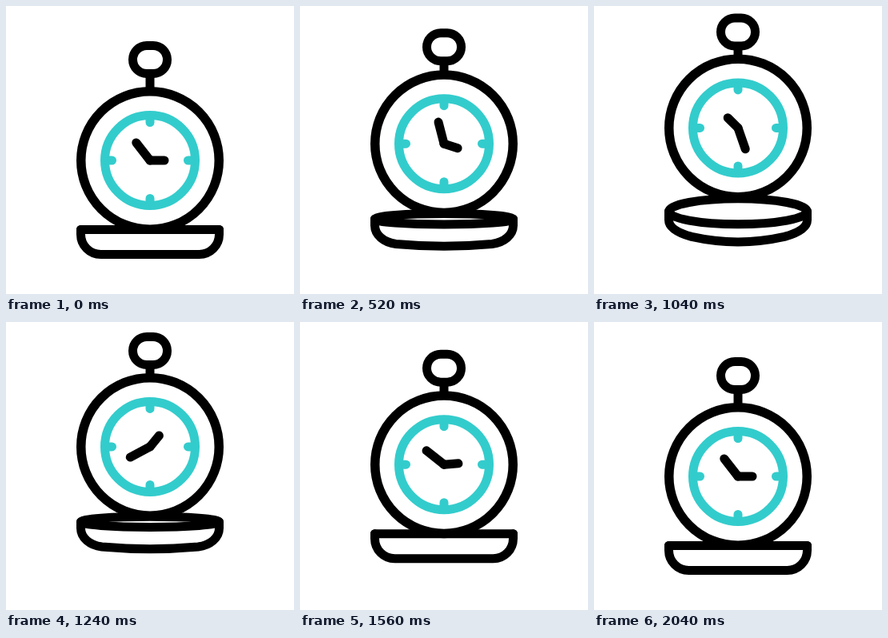
An HTML page for the animation above (2.08 s loop, 360 by 360 pixels).

```html
<!DOCTYPE html>
<html lang="en">
<head>
<meta charset="utf-8">
<title>Pocket watch</title>
<style>
  html, body { margin: 0; width: 100%; height: 100%; overflow: hidden; background: #fff; }
  svg { display: block; width: 100vw; height: 100vh; }
  .line { fill: none; stroke: #000; stroke-width: 11; stroke-linecap: round; stroke-linejoin: round; }
  .dial { stroke: #33cccc; }
</style>
</head>
<body>
<svg viewBox="0 0 360 360">
  <g id="watch" class="line">
    <path id="dish"/>
    <path id="rim"/>
    <g id="crown">
      <rect x="158.5" y="49.5" width="43" height="35" rx="17.5"/>
      <path d="M180 87V104" stroke-linecap="butt"/>
    </g>
    <g transform="translate(180 193)">
      <circle r="86.25" stroke-width="11.5"/>
      <g class="dial">
        <circle r="56.5"/>
        <path d="M0 -56V-47.5M0 56V47.5M-56 0H-47.5M56 0H47.5"/>
      </g>
      <path id="minute" d="M0 0V-28"/>
      <path id="hour" d="M0 0V-18"/>
    </g>
  </g>
</svg>
<script>
  const LOOP = 2080;
  const part = id => document.getElementById(id);
  const set = (id, name, value) => part(id).setAttribute(name, value);

  const progress = (t, from, to) => Math.min(1, Math.max(0, (t - from) / (to - from)));
  const smooth = p => p * p * (3 - 2 * p);
  // Slow start and end; a larger power makes the middle faster.
  const swing = (p, power) => p ** power / (p ** power + (1 - p) ** power);
  // Rises from 0 to 1, holds, then falls back to 0.
  const pulse = (t, upStart, upEnd, downStart, downEnd) =>
    smooth(progress(t, upStart, upEnd)) - smooth(progress(t, downStart, downEnd));

  const shift = (id, y) => set(id, 'transform', `translate(0 ${y})`);
  const turn = (id, angle) => set(id, 'transform', `rotate(${angle})`);

  function drawLid(open) {
    const mix = (shut, wide) => shut + (wide - shut) * open;
    const left = 93.5, right = 360 - left, radius = 86.5;
    const hinge = mix(279.5, 297.4), depth = 16 * open;
    const side = mix(285.5, 308), curve = mix(299.3, 317);
    const bendX = 104.5, bendY = mix(310.5, 324);
    const baseX = mix(118.5, 122), baseY = mix(310.5, 329), bulge = mix(310.5, 342);

    set('rim', 'd', `M${left} ${hinge}
      A${radius} ${depth} 0 0 1 ${right} ${hinge}
      A${radius} ${depth} 0 0 1 ${left} ${hinge}Z`);
    set('dish', 'd', `M${left} ${hinge}V${side}
      C${left} ${curve} ${bendX} ${bendY} ${baseX} ${baseY}
      Q180 ${bulge} ${360 - baseX} ${baseY}
      C${360 - bendX} ${bendY} ${right} ${curve} ${right} ${side}V${hinge}`);
  }

  function draw(now) {
    const t = now % LOOP;
    shift('watch', -40.6 * pulse(t, 130, 900, 1100, 1880));
    shift('crown', 6.2 * pulse(t, 200, 640, 1440, 2000));
    drawLid(pulse(t, 360, 720, 1040, 1400));
    turn('minute', -38 + 360 * swing(progress(t, 0, 2000), 2.55));
    turn('hour', 90 + 360 * swing(progress(t, 0, 1920), 3));
  }

  const start = performance.now();
  function frame() {
    draw(performance.now() - start);
    requestAnimationFrame(frame);
  }
  frame();
</script>
</body>
</html>
```
